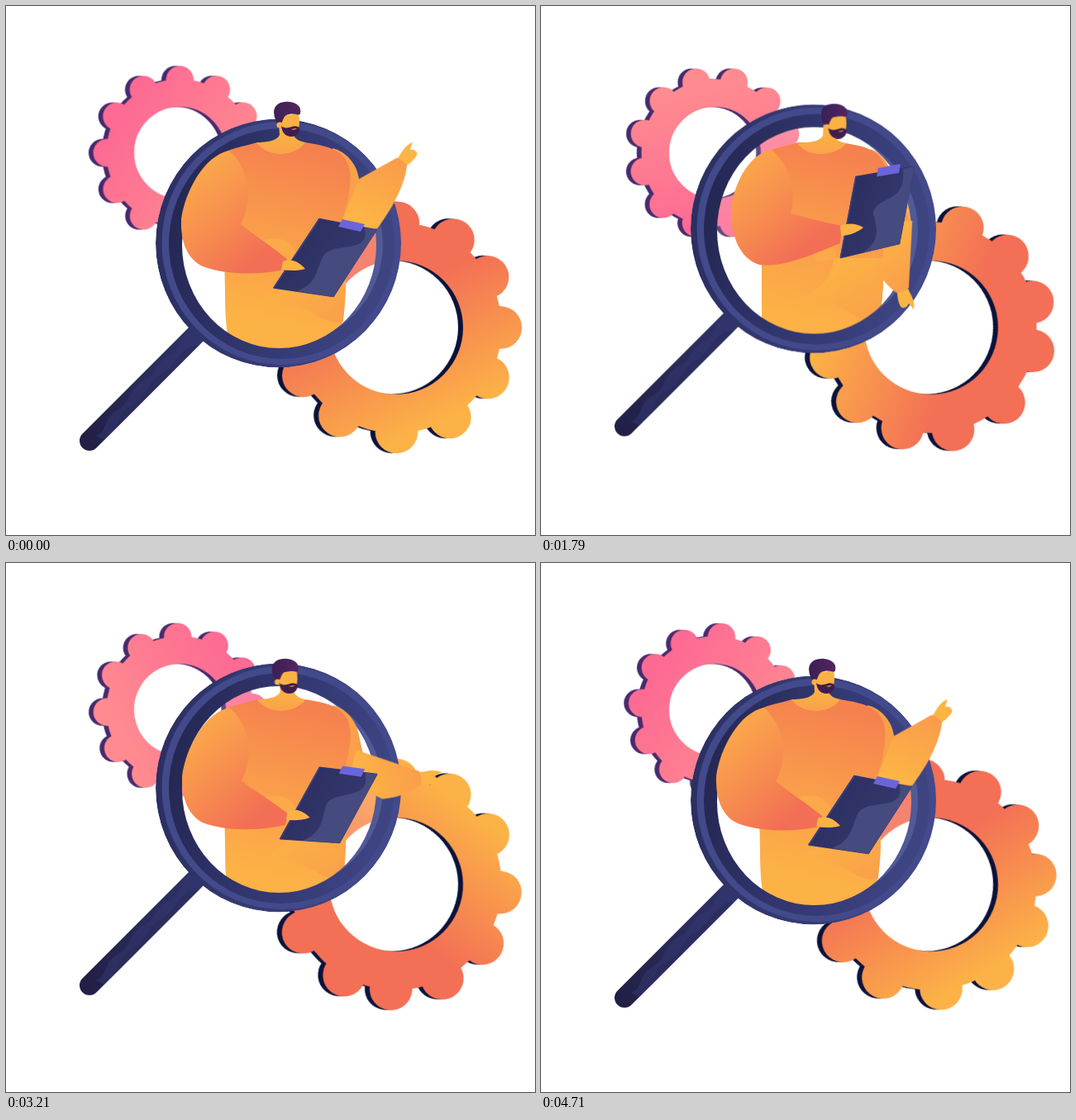
Recreate the animation shown at these times as an HTML page. Size 640 by 640 pixels, loop 4780 ms.

```html
<!DOCTYPE html>
<html lang="en">
<head>
<meta charset="utf-8">
<title>Inspector with magnifier and gears</title>
<style>
  html, body { margin: 0; width: 100%; height: 100%; overflow: hidden; background: #fff; }
  svg { display: block; width: 100vw; height: 100vh; }

  .cw, .ccw, .bob, .body, .board, .head, .arm, .sleeve, .hand {
    animation: 4780ms ease-in-out infinite;
  }
  .cw  { animation-name: spin; animation-timing-function: linear; }
  .ccw { animation-name: spin; animation-timing-function: linear; animation-direction: reverse; }
  .bob { animation-name: bob; animation-timing-function: cubic-bezier(.3642, 0, .6358, 1); }
  .body { d: var(--a); animation-name: body; }
  .board { d: var(--a); animation-name: board; }
  .sleeve { d: var(--a); animation-name: sleeve; }
  .head { animation-name: head; }
  .arm { animation-name: arm; }
  .hand { animation-name: hand; }

  @keyframes spin { to { transform: rotate(360deg); } }
  @keyframes bob { 50% { transform: translateY(-20.5px); } }
  @keyframes body {
    0%, 69.7%, 100% { d: var(--a); }
    15.8%, 55.4% { d: var(--b); }
  }
  @keyframes board {
    0%, 72%, 100% { d: var(--a); }
    15.8%, 56.5% { d: var(--b); }
  }
  @keyframes head {
    0%, 75%, 100% { transform: translate(0, 0); }
    15.5%, 55.4% { transform: translate(14.5px, 2.5px); }
    67% { transform: translate(-2.5px, 0); }
  }
  @keyframes arm {
    0%, 74.5%, 100% { transform: rotate(-47deg); }
    17.4%, 57.7% { transform: rotate(75deg); }
  }
  @keyframes sleeve {
    0%, 74.5%, 100% { d: var(--a); }
    14%, 57.7%, 67% { d: var(--b); }
  }
  @keyframes hand {
    0%, 74.5%, 100% { transform: translateX(0); }
    14%, 57.7%, 67% { transform: translateX(-9.5px); }
  }
</style>
</head>
<body>
<svg viewBox="0 0 640 640">
  <defs>
    <linearGradient id="pink" gradientUnits="userSpaceOnUse" x1="-71" y1="-46" x2="67" y2="44">
      <stop stop-color="#fd6a93"/><stop offset="1" stop-color="#ff8b90"/>
    </linearGradient>
    <linearGradient id="orange" gradientUnits="userSpaceOnUse" x1="-17" y1="-36" x2="53" y2="113">
      <stop stop-color="#f36f56"/><stop offset="1" stop-color="#fcb247"/>
    </linearGradient>
    <linearGradient id="rim">
      <stop stop-color="#2b2f62"/><stop offset="1" stop-color="#434a8b"/>
    </linearGradient>
    <linearGradient id="inner" x2="1" y2=".2">
      <stop stop-color="#23254d"/><stop offset=".5" stop-color="#31366e"/><stop offset="1" stop-color="#3e4482"/>
    </linearGradient>
    <linearGradient id="grip" gradientUnits="userSpaceOnUse" x1="95" y1="532" x2="232" y2="395">
      <stop stop-color="#211f45"/><stop offset=".6" stop-color="#2a2c5a"/><stop offset="1" stop-color="#2e3266"/>
    </linearGradient>
    <linearGradient id="shirt" gradientUnits="userSpaceOnUse" x1="375" y1="180" x2="325" y2="385">
      <stop stop-color="#f5814f"/><stop offset=".45" stop-color="#f99b4b"/><stop offset="1" stop-color="#fdb246"/>
    </linearGradient>
    <linearGradient id="fold" gradientUnits="userSpaceOnUse" x1="345" y1="325" x2="385" y2="390">
      <stop stop-color="#fcb145"/><stop offset="1" stop-color="#f9a14a"/>
    </linearGradient>
    <linearGradient id="near" gradientUnits="userSpaceOnUse" x1="228" y1="205" x2="310" y2="300">
      <stop stop-color="#fba64b"/><stop offset=".5" stop-color="#f78d4f"/><stop offset="1" stop-color="#f26f55"/>
    </linearGradient>
    <linearGradient id="far" gradientUnits="userSpaceOnUse" x1="10" y1="20" x2="92" y2="-8">
      <stop stop-color="#fdb645"/><stop offset="1" stop-color="#f99c4b"/>
    </linearGradient>
    <linearGradient id="neck" x2="0" y2="1">
      <stop offset=".4" stop-color="#fcb145"/><stop offset="1" stop-color="#faa24a"/>
    </linearGradient>
    <linearGradient id="hair">
      <stop stop-color="#3b2055"/><stop offset="1" stop-color="#532560"/>
    </linearGradient>
    <linearGradient id="plate" x2="1" y2=".5">
      <stop stop-color="#292b5b"/><stop offset="1" stop-color="#363a70"/>
    </linearGradient>
    <clipPath id="ring">
      <path clip-rule="evenodd" d="M181 287a148.5 150.5 0 1 0 297 0a148.5 150.5 0 1 0-297 0z
        M213 289a117.5 125 0 1 0 235 0a117.5 125 0 1 0-235 0z"/>
    </clipPath>

    <!-- a rim plus round dashes for the teeth -->
    <g id="small" fill="none">
      <circle r="72.2" stroke-width="33.6"/>
      <circle r="88.2" stroke-width="33.4" stroke-linecap="round" pathLength="12" stroke-dasharray="0 1"/>
    </g>
    <g id="large" fill="none">
      <circle r="104.3" stroke-width="46.6"/>
      <circle r="126.4" stroke-width="51.6" stroke-linecap="round" pathLength="360"
        stroke-dasharray="0 28.5 0 30.5 0 30.7 0 32.8 0 30 0 29.5 0 29 0 27 0 33 0 32 0 28 0 29"/>
    </g>
  </defs>

  <g transform="translate(204.8 177.5)" stroke="#472a6d"><g class="ccw"><use href="#small"/></g></g>
  <g transform="translate(210.5 177.5)" stroke="url(#pink)"><g class="ccw"><use href="#small"/></g></g>
  <g transform="translate(466 388.7)" stroke="#0c1239"><g class="cw"><use href="#large"/></g></g>
  <g transform="translate(472 389)" stroke="url(#orange)"><g class="cw"><use href="#large"/></g></g>

  <!-- lens glass and handle -->
  <g class="bob">
    <path d="M101 526L236 391" stroke="url(#grip)" stroke-width="24" stroke-linecap="round"/>
    <path fill="#343872" opacity=".55" d="M109 520C124 514 116 501 134 489C152 480 148 463 166 453C184 446 178 432 196 424C212 418 208 404 222 390L240 404L119 525Z"/>
    <path fill="#262850" opacity=".45" d="M128 516C142 504 134 492 150 484C172 474 166 462 184 448C206 436 200 428 222 412L234 410Z"/>
    <ellipse cx="330.5" cy="289" rx="118" ry="125.5" fill="#fff" opacity=".15"/>
  </g>

  <!-- lower torso, behind the ring -->
  <path class="body" fill="url(#shirt)" style="
    --a:path('M264 295L265 345C265 370 266 385 268 397C290 412 315 415 335 415C362 415 388 405 405 390C410 375 411 350 411 338L411 295Z');
    --b:path('M267 295L267 345C267 370 267 385 268 397C290 412 315 415 335 415C362 415 388 405 407 389C412 375 413 350 414 338L414 295Z')"/>
  <path class="body" fill="url(#fold)" style="
    --a:path('M294 369C325 354 350 356 372 372C388 383 400 384 408 382L411 338L411 290L350 288C362 335 322 350 294 369Z');
    --b:path('M297 367C328 354 354 356 374 371C390 383 402 385 410 382L414 338L414 290L353 288C362 335 324 350 297 367Z')"/>

  <!-- ring -->
  <g class="bob">
    <g clip-path="url(#ring)">
      <ellipse cx="329.5" cy="287" rx="148.5" ry="150.5" fill="url(#rim)"/>
      <ellipse cx="333.5" cy="287" rx="145" ry="147" fill="#434a8b"/>
      <ellipse cx="333.5" cy="287.5" rx="136.5" ry="139.5" fill="url(#inner)"/>
      <ellipse cx="335" cy="288.5" rx="121" ry="121" fill="#505a96"/>
    </g>
  </g>

  <!-- far arm -->
  <path class="body" fill="#fa9f4a" style="
    --a:path('M395 172C412 176 425 192 427 209L440 268L404 270Z');
    --b:path('M398 173C412 177 422 192 428 212L447 262L412 290Z')"/>
  <g transform="translate(414 260)">
    <g class="arm">
      <path class="hand" fill="#fcb445" d="M92-7L108-10Q116-11 123-8L114-4Q120 1 116 6Q110 9 92 5Z"/>
      <path class="sleeve" fill="url(#far)" style="
        --a:path('M-7 -5L46 -25L96 -9Q99 -2 98 6Q71 26 17 32Z');
        --b:path('M0 6L9 -34L86 -9Q90 -2 88 7Q70 22 42 25Z')"/>
    </g>
  </g>

  <!-- upper torso -->
  <path class="body" fill="url(#shirt)" style="
    --a:path('M304 165C288 170 268 172 255 183L264 305L411 305C406 285 406 275 406 262C414 235 421 207 413 190C405 172 385 169 362 165Z');
    --b:path('M311 165C296 170 276 172 263 182L267 305L414 305C414 285 414 262 415 245C420 230 424 212 417 195C408 172 390 170 369 166Z')"/>
  <path class="body" fill="#fba949" style="
    --a:path('M312 283C340 277 350 290 352 306L330 310Z');
    --b:path('M320 288C345 282 356 286 357 306L335 310Z')"/>
  <path class="body" fill="url(#near)" style="
    --a:path('M270 175C240 181 217 223 212 258C211 285 219 306 238 315C264 325 305 326 336 319L340 306C320 290 300 277 284 264C297 240 299 202 270 175Z');
    --b:path('M279 174C251 179 234 215 230 244C229 275 239 305 264 313C292 317 328 301 362 287L364 266C344 262 322 256 302 251C307 232 308 200 279 174Z')"/>

  <!-- neck and head -->
  <path class="body" fill="url(#neck)" style="
    --a:path('M330 140L331 156C328 163 316 165 303 165C316 184 350 183 362 165C351 163 347 158 347 150Z');
    --b:path('M342 140L341 157C337 164 326 165 310 166C322 184 355 183 370 166C358 164 354 160 354 150Z')"/>
  <g class="head">
    <path fill="#fcb144" d="M332 133L354 130Q356 140 354 148L336 152L331 145Z"/>
    <path fill="url(#hair)" d="M324 128C325 118 334 115 343 116C352 117 358 122 356 130C355 134 350 129 343 131C335 132 336 138 333 142C331 145 328 143 327 140Q324 134 324 128Z"/>
    <circle cx="331" cy="144" r="3.6" fill="#fcb144"/>
    <path fill="#401d50" d="M333 145C337 149 342 147 346 146Q350 144 355 147C356 153 352 158 345 158C338 158 334 153 333 145Z"/>
    <path fill="#fcb144" d="M345 149L352 148Q349 151 345 149Z"/>
  </g>

  <!-- clipboard -->
  <path class="board" fill="url(#plate)" stroke="#30346c" stroke-width="1.5" stroke-linejoin="round" style="
    --a:path('M379 257.5L448 271L396 351.5L324 341Z');
    --b:path('M381 206.5L451 194.5L433.5 287.5L362.5 304.5Z')"/>
  <path class="board" fill="#454a7f" style="
    --a:path('M434 268L449 271L396 352L352 345C378 335 375 318 384 302C395 288 420 296 432 284C436 278 434 272 434 268Z');
    --b:path('M438 197L452 194L434 288L388 299C410 285 408 272 402 252C402 236 425 236 434 222C440 212 438 205 438 197Z')"/>
  <path class="board" fill="none" stroke="#3b4080" stroke-width="1.6" style="
    --a:path('M379 258L324 341'); --b:path('M381 207L362.5 304')"/>
  <path class="board" fill="#6a65da" style="
    --a:path('M407 258L434 264L429 273L402 267Z');
    --b:path('M408 196L435 191L433 202L406 206.5Z')"/>
  <path class="board" fill="#fcb245" style="
    --a:path('M335 309C343 306 352 307 362 318C352 321 343 320 333 319Z');
    --b:path('M362 266C372 262 382 263 390 268C383 274 372 278 363 278Z')"/>
</svg>
</body>
</html>
```
